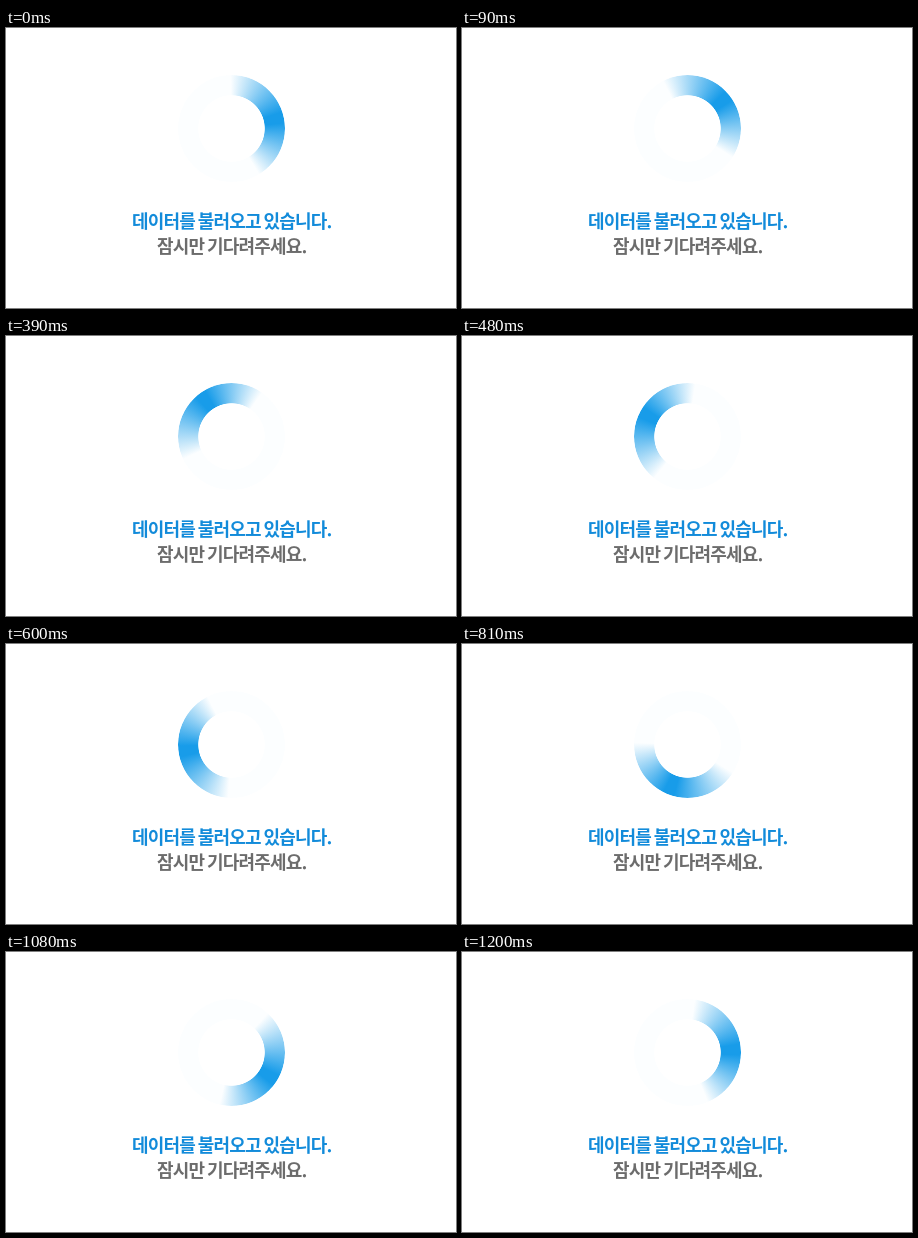
These frames come from a looping animation (450 px wide and 280 px high, 1230 ms). An HTML page:

```html
<!DOCTYPE html>
<html lang="ko">
<head>
<meta charset="utf-8">
<style>
  html, body { margin: 0; width: 100%; height: 100%; overflow: hidden; background: #fff; }
  #ring {
    position: absolute; left: 172px; top: 47px; width: 107px; height: 107px; border-radius: 50%;
    -webkit-mask: radial-gradient(circle, transparent 32.9px, #000 33.6px);
    mask: radial-gradient(circle, transparent 32.9px, #000 33.6px);
  }
  svg { position: absolute; left: 0; top: 0; }
  text {
    font: 700 18px "Noto Sans CJK KR", "Noto Sans CJK", "Noto Sans KR", sans-serif;
    letter-spacing: -0.8px; word-spacing: -1.5px;
  }
</style>
</head>
<body>
<div id="ring"></div>
<svg width="450" height="280">
  <text x="126" y="199.5" fill="#128bda">데이터를 불러오고 있습니다.</text>
  <text x="151" y="224.5" fill="#6c6c6c">잠시만 기다려주세요.</text>
</svg>
<script>
  const STEP = 30, STEPS = 41, START = 78;
  const ring = document.getElementById('ring');

  function draw(now) {
    const step = Math.floor(now / STEP) % STEPS;
    const peak = START - step * 360 / STEPS;
    ring.style.background = `conic-gradient(from ${peak - 180}deg, #fcfeff 101deg,
      #189ce9 174deg, #189ce9 186deg, #fcfeff 251deg)`;
    requestAnimationFrame(draw);
  }
  draw(0);
</script>
</body>
</html>
```
